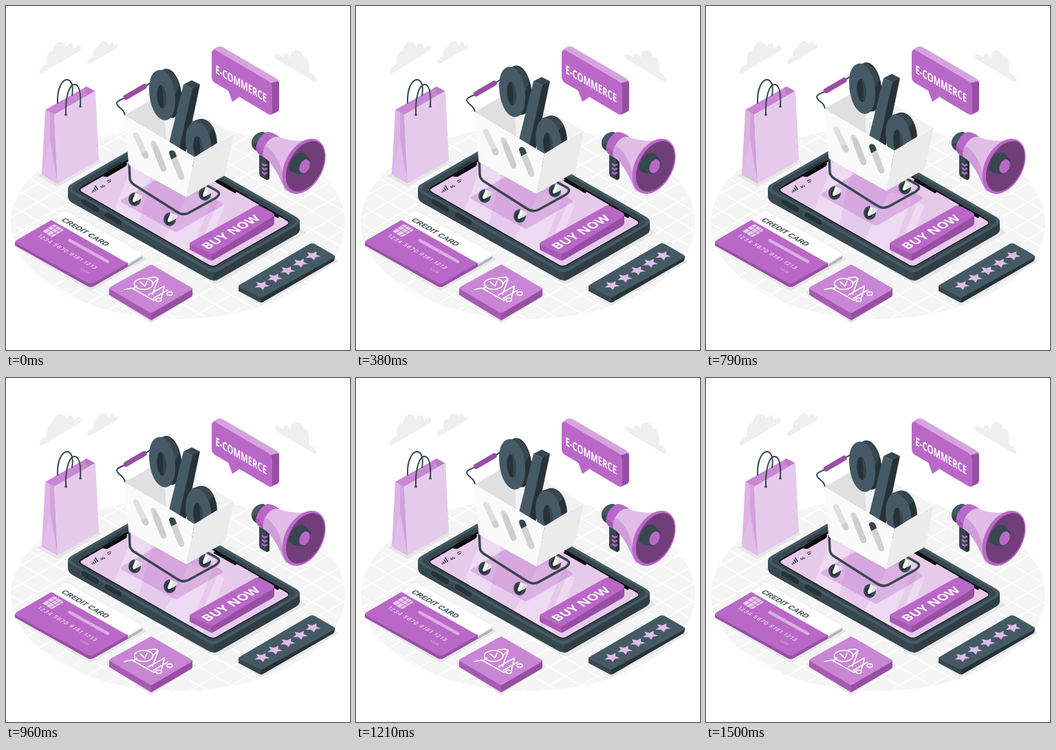
These frames come from a looping animation (500x500 px, 1540 ms). An HTML page:

```html
<!DOCTYPE html>
<html lang="en">
<head>
<meta charset="utf-8">
<title>E-commerce</title>
<style>
html, body { margin: 0; width: 100%; height: 100%; overflow: hidden; background: #fff; }
svg { display: block; width: 100vw; height: 100vh; }
text { font-family: "Open Sans", "Noto Sans", sans-serif; font-weight: 700; fill: #fff; }
.p { fill: #ba68c8; }
.p1 { fill: #c986d4; }
.p2 { fill: #964fa3; }
.p3 { fill: #d5a4de; }
.p4 { fill: #e6caec; }
.d { fill: #37474f; }
.d1 { fill: #455a64; }
.d2 { fill: #263238; }
.sh { fill: #e6e6e6; }
.rod { fill: none; stroke: #37474f; stroke-linecap: round; stroke-linejoin: round; }
.ink { fill: none; stroke: #fff; stroke-width: 1.7; stroke-linecap: round; stroke-linejoin: round; }
</style>
</head>
<body>
<svg viewBox="0 0 500 500">
<defs>
  <clipPath id="floorClip"><ellipse cx="250" cy="315" rx="243" ry="140"/></clipPath>
  <clipPath id="screenClip"><path id="screen" d="M110 265L214 205Q218 203 222 205L408 312Q413 315 408 318L306 376Q301 379 295 376L110 270Q106 267 110 265Z"/></clipPath>
  <clipPath id="slotClip"><path id="slots" d="M185 189C184 183 191 182 193 187L207 216C209 222 202 224 199 219ZM210 201C209 195 216 194 219 199L233 235C234 241 228 243 225 238ZM237 215C236 209 243 208 246 213L259 247C260 253 254 255 251 250Z"/></clipPath>
  <g id="wheel">
    <ellipse class="d" rx="9" ry="10"/>
    <ellipse class="d2" cx="-1" cy="1" rx="5" ry="6.5"/>
    <path d="M-3 3C-3-2 0-4 1-10L11-5C9 1 3 2 0 4Q-2 5-3 3Z" fill="#fafafa"/>
    <path d="M5-8L11-5C9 1 3 2 0 4Q4-1 5-8Z" fill="#e0e0e0"/>
  </g>
</defs>

<rect width="500" height="500" fill="#fff"/>
<g clip-path="url(#floorClip)">
  <rect y="170" width="500" height="290" fill="#f5f5f5"/>
  <path id="grid" stroke="#fff" stroke-width="1.3" fill="none"/>
</g>

<g fill="#efefef">
  <path d="M49 98C47 93 53 87 60 84C57 74 63 63 68 66C68 56 78 48 85 55Q88 58 87 61C92 51 99 52 98 62L105 57C110 56 111 63 106 66L54 97Q50 99 49 98Z"/>
  <path d="M118 83C117 79 122 75 127 73C125 65 130 58 134 60C135 52 142 49 147 53Q149 55 149 58C152 50 157 50 157 58L160 56C164 55 164 60 160 62L122 84Q119 85 118 83Z"/>
  <path d="M451 110C454 105 447 100 440 96C443 83 438 71 432 74C431 66 422 61 416 67Q413 71 414 76C411 68 404 66 403 75L395 70C390 68 389 75 394 78L446 109Q450 111 451 110Z"/>
</g>

<!-- shopping bag -->
<path class="sh" d="M45 246L75 263L138 227L128 221Z"/>
<path class="p1" d="M57 151L117 117L130 124L70 158Z"/>
<path class="p2" opacity=".25" d="M117 117L130 124L120 130L113 119Z"/>
<path class="rod" stroke-width="2" d="M75 141C74 119 82 107 89 107C96 108 98 118 96 130"/>
<path d="M57 151L70 158L75 258L52 245Z" fill="#dcb5e4"/>
<path d="M64 155L70 158L75 258L64 195Z" fill="#d2a2dc"/>
<path d="M52 245L64 195L75 258Z" fill="#e0bee7"/>
<path class="p4" d="M70 158L130 123L135 224L75 258Z"/>
<path class="rod" stroke-width="2" d="M87 157C86 130 93 113 100 114C107 115 109 128 108 146"/>
<g class="d"><circle cx="87" cy="158" r="1.8"/><circle cx="108" cy="146" r="1.8"/></g>

<!-- phone -->
<path class="sh" d="M86 278L300 403Q307 405 314 401L436 330L420 315L110 262Z"/>
<path class="d" d="M90 265V276Q90 282 96 286L293 396Q302 402 311 396L422 332Q428 328 427 322V312L300 300Z"/>
<path class="d2" d="M302 389V400Q307 399 311 396L422 332Q428 328 427 322V312Z" opacity=".45"/>
<path class="d1" d="M96 258L207 194Q216 189 225 194L421 306Q433 313 421 320L311 384Q302 390 292 384L96 272Q84 265 96 258Z"/>
<path d="M100 260L209 197Q216 193 223 197L417 308Q425 313 417 318L309 380Q302 384 294 380L100 270Q92 265 100 260Z" fill="#37474f"/>
<path d="M108 264L212 203Q217 200 223 203L408 310Q415 314 408 319L306 377Q301 380 295 377L108 270Q104 267 108 264Z" fill="#000"/>
<use href="#screen" class="p4"/>
<g clip-path="url(#screenClip)">
  <path d="M196 200L222 200L190 330L152 310ZM267 270L300 280L262 375L224 350ZM308 285L318 290L282 380L270 375Z" fill="#fff" opacity=".3"/>
  <path d="M305 252L335 269L333 271L303 254ZM369 289L397 305L395 307L367 291Z" stroke="#000" stroke-width="2"/>
  <path d="M134 250L140 247Q144 249 148 248L174 233Q177 230 175 227L186 220L184 214L132 244Z"/>
</g>
<path class="d2" d="M147 237L166 226Q169 226 168 229L150 239Q146 240 147 237Z"/>
<g fill="none" stroke="#263238" stroke-width="1.5">
  <path d="M126 271l-1-1.5M128.500 270l-2-3M131 268.500l-3-4.500M133.500 267l-4-6"/>
  <path d="M147 255q2-3 6-2M148.500 257q1.500-2 4-1.500" stroke-width="1.100"/>
</g>
<text transform="matrix(.866 -.5 .866 .5 139 265)" font-size="5.500" style="fill:#263238">4G</text>
<g class="d2" stroke="#455a64" stroke-width="1">
  <path d="M109 281Q111 279 115 281L133 291Q137 294 136 299Q134 302 130 300L112 289Q107 286 109 281Z"/>
  <path d="M143 301Q145 298 149 300L166 310Q170 313 169 318Q167 320 163 318L146 308Q141 305 143 301Z"/>
</g>

<!-- buy button -->
<path class="p2" d="M267 345V354L296 369Q299 371 302 369L387 320Q390 318 390 314V302Z"/>
<path d="M267 345V354L296 369L299 370V360Z" fill="#a85bb5"/>
<path class="p" d="M269 343L362 291Q366 289 370 291L387 300Q392 303 387 307L303 359Q299 361 295 359L269 347Q265 345 269 343Z"/>
<text transform="matrix(.866 -.5 .8 .5 293 354.500)" font-size="18.500">BUY NOW</text>

<!-- credit card -->
<path class="sh" d="M10 348L123 414L204 368L190 355Z"/>
<path d="M66 311L82 298Q86 296 90 298L196 358Q199 360 198 363V368L177 381Z" fill="#fafafa"/>
<path d="M176 375L198 362V368L177 381Z" fill="#e0e0e0"/>
<path d="M177 377L198 364.500M177 379L198 366.500" stroke="#455a64" stroke-width=".6"/>
<path d="M66 311L82 298Q86 296 90 298L196 358Q199 360 198 362L176 375Z" fill="#fff" stroke="#e6e6e6" stroke-width=".7"/>
<path class="p2" d="M13 343V348L118 407Q123 410 128 407L177 379V373Z"/>
<path class="p" d="M16 340L66 311L177 374L128 402Q123 405 118 402L16 346Q11 343 16 340Z"/>
<text transform="matrix(.866 .5 -.866 .5 79.500 311.500)" font-size="11" style="fill:#37474f;font-family:'Liberation Sans',Arial,sans-serif">CREDIT CARD</text>
<path class="p4" d="M54 327L68 318Q70 317 72 318L82 324Q85 326 82 327L69 335Q67 336 65 335L55 329Q53 328 54 327Z"/>
<path d="M60 323L75 332M66 320L79 328M58 331L75 320M64 334L81 324" class="ink" style="stroke:#ba68c8;stroke-width:1"/>
<path d="M92.500 340.500L148 371.500" stroke="#d9aee2" stroke-width="4.500" stroke-linecap="round"/>
<g style="font-family:Inter,sans-serif">
  <text id="digits" transform="matrix(.866 .5 -.866 .5 45 334.500)" font-size="8.200" letter-spacing=".95" style="font-weight:500;fill:#f4e6f7;font-family:Inter,sans-serif">1234 5670 9181 1213</text>
  <text transform="matrix(.866 .5 -.866 .5 106.500 382)" font-size="5" style="font-weight:500;fill:#ead2ef">12/20</text>
</g>

<!-- cart tile -->
<path class="sh" d="M145 416L211 461L276 418L211 385Z"/>
<path d="M150 410V420L208 455Q211 457 211 457V440Z" fill="#a65ab3"/>
<path class="p2" d="M211 440V457L269 423Q271 422 271 420V410Z"/>
<path class="p1" d="M152 408L208 377Q211 375 214 377L269 409Q272 411 269 413L214 445Q211 447 208 445L152 412Q149 410 152 408Z"/>
<g class="ink">
  <path d="M172 412L183 410L215 428L219 425M185 411L190 407M214 403L221 396L217 394L207 395M207 420L230 407M214 425L235 413M221 397L213 419M230 409L226 424"/>
  <ellipse cx="200" cy="404" rx="13.500" ry="8"/>
  <path d="M195 401L202 407L205 400"/>
  <ellipse cx="222" cy="427" rx="4" ry="2.500"/><ellipse cx="238" cy="418" rx="4" ry="2.500"/>
</g>

<!-- rating bar -->
<path class="sh" d="M334 413L371 435L483 371L470 360Z"/>
<path class="d2" d="M338 408V414L368 430Q371 432 374 430L476 371Q478 369 478 363Z"/>
<path class="d" d="M338 408V414L368 430L371 431V422Z"/>
<path class="d1" d="M340 405L441 346Q445 344 449 346L475 361Q480 364 475 367L375 422Q371 425 367 422L340 409Q336 407 340 405Z"/>
<path id="stars" fill="#e0bbe7"/>

<!-- speech bubble -->
<path class="p1" d="M299 68Q300 62 309 59Q312 59 315 60L392 105Q397 108 397 113L387 120Z"/>
<path class="p3" d="M302 63L310 59Q313 59 316 61L392 105Q395 107 396 110L387 115Q386 112 381 109L310 68Q305 64 302 63Z"/>
<path class="p2" d="M385 112L396 109Q397 111 397 114V149Q397 152 394 154L385 158ZM329 139L338 133L338 128L325 125Z"/>
<path class="p" d="M299 69Q299 62 306 65L381 109Q387 113 387 119V153Q387 160 381 157L339 132L329 139L323 123L304 112Q299 109 299 103Z"/>
<text transform="matrix(.665 .384 0 1 304.500 97.500)" font-size="17">E-COMMERCE</text>

<!-- megaphone -->
<path class="d" d="M368 216L383 222V250Q381 254 377 252L370 248Q368 246 368 243Z"/>
<path class="d2" d="M378 221L383 223V250Q381 254 378 252Z"/>
<path d="M372 229l4 3l4-2M372 235l4 3l4-2M372 241l4 3l4-2" fill="none" stroke="#ba68c8" stroke-width="2.400"/>
<path class="d" d="M374 183C363 183 356 193 357 201C358 208 363 211 369 212L385 192Z"/>
<path class="d1" d="M374 183C363 183 356 193 357 201L366 198Q370 190 380 186Z"/>
<path class="p" d="M380 183C370 186 361 202 364 211Q367 217 376 220L397 190Q388 183 380 183Z"/>
<path class="p2" opacity=".55" d="M364 205Q363 213 376 220L381 214Q371 212 368 206Z"/>
<path d="M395 190Q422 200 452 193L407 270C396 245 388 228 374 219C372 206 382 189 395 190Z" fill="#e0bee7"/>
<path d="M374 219C372 213 375 207 378 203Q402 222 403 258L407 270C396 245 388 228 374 219Z" fill="#cf9dda"/>
<ellipse class="p" cx="433" cy="233" rx="27.500" ry="43" transform="rotate(28 433 233)"/>
<ellipse cx="435" cy="233" rx="24" ry="39.500" transform="rotate(28 435 233)" fill="#713e79"/>
<path class="d" d="M411 238C412 222 422 210 434 214L443 225L432 244Q421 246 411 238Z"/>
<ellipse class="p" cx="434" cy="233" rx="7" ry="10.500" transform="rotate(24 434 233)"/>

<!-- floating cart -->
<g id="cart">
  <path d="M169 281L231 245Q235 243 239 245L313 286Q317 289 313 291L251 327Q247 330 243 327L169 286Q165 284 169 281Z" fill="#ba68c8" opacity=".36"/>
  <path class="rod" stroke-width="2" d="M173 160C173 149 161 148 161 141C161 138 168 136 174 133L202 117L211 111L216 114"/>
  <path d="M174.500 132.500L201 117" stroke="#964fa3" stroke-width="7.500" stroke-linecap="round"/>
  <use href="#wheel" x="289" y="273"/>
  <path class="rod" stroke-width="3.500" d="M179 229L180 250Q180 255 185 259L248 299Q257 305 265 301L305 279Q313 273 307 269L291 260"/>
  <use href="#wheel" x="187" y="281"/>
  <use href="#wheel" x="238" y="310"/>
  <path d="M172 159L229 126L233 194L180 232Z" fill="#e0e0e0"/>
  <path d="M229 126L330 186L274 224L233 194Z" fill="#f2f2f2"/>
  <g>
    <ellipse class="d2" cx="237" cy="127" rx="18" ry="36" transform="rotate(-8 237 127)"/>
    <path class="d" d="M222 95L231 91.500Q245 94 252 116L245 130Z"/>
    <path class="d1" fill-rule="evenodd" d="M208 120C208 101 216 92 225 93C238 95 246 115 246 137C246 157 239 167 230 166C217 164 208 143 208 120Z"/>
    <ellipse class="d2" cx="226" cy="132" rx="6.500" ry="17" transform="rotate(-5 226 132)"/>
    <path class="d" d="M226 115Q232 120 232 134Q232 145 228 149Q230 130 226 115Z"/>
    <path class="d2" d="M271 119L282 114L261 214L248 211Z"/>
    <path class="d1" d="M258 114L271 120L251 211L236 203Z"/>
    <path class="d" d="M258 114L270 108L282 114L271 120Z"/>
    <path class="d2" d="M272 171L284 164C298 164 308 184 307 205L298 225Z"/>
    <path class="d" d="M270 168L282 164Q294 164 302 178L294 186Z"/>
    <path class="d1" d="M261 196C261 177 268 167 277 168C290 170 299 189 299 211L292 236L272 232Q261 215 261 196Z"/>
    <ellipse class="d2" cx="279" cy="206" rx="6.800" ry="17" transform="rotate(-5 279 206)"/>
    <path class="d" d="M280 189Q286 195 286 208L282 221Q283 204 280 189Z"/>
  </g>
  <path d="M172 159L274 220L262 278L180 232Q178 231 178 227Z" fill="#fafafa"/>
  <path d="M274 220L331 185L319 243Q318 246 315 248L262 278Z" fill="#ebebeb"/>
  <path d="M172 159L274 220L331 185" fill="none" stroke="#fff" stroke-width="1"/>
  <use href="#slots" fill="#e0e0e0"/>
  <g clip-path="url(#slotClip)">
    <path d="M192 216L210 208V230H192ZM212 195L236 222V245H220Z" fill="#cecece"/>
    <path d="M236 214L262 232V260H244Z" fill="#d2d2d2"/>
    <path class="d" d="M234 205H250L248 219L240 223Z"/>
  </g>
</g>
</svg>
<script>
const byId = id => document.getElementById(id);
const LOOP = 1540, LIFT = 9.6, SLOPE = 0.577;

let grid = "";
for (let y = -120; y < 760; y += 27) {
  grid += `M0 ${y}L500 ${y + 500 * SLOPE}M0 ${y}L500 ${y - 500 * SLOPE}`;
}
byId("grid").setAttribute("d", grid);

// five-pointed star lying on the floor plane
function star(cx, cy) {
  let d = "";
  for (let i = 0; i < 10; i++) {
    const r = i % 2 ? 4.6 : 9.6, a = i * Math.PI / 5 - Math.PI / 2;
    const u = r * Math.cos(a), v = r * Math.sin(a);
    d += `${i ? "L" : "M"}${(cx + 0.866 * (u + v)).toFixed(1)} ${(cy + 0.5 * (v - u)).toFixed(1)}`;
  }
  return d + "Z";
}
byId("stars").setAttribute("d", [0, 1, 2, 3, 4].map(i => star(372 + 18.5 * i, 406 - 10.8 * i)).join(""));

const cart = byId("cart");
const start = performance.now();
function draw(now) {
  const p = Math.max(0, now - start) % LOOP / LOOP;
  const y = -LIFT * (1 - Math.abs(1 - 2 * p));
  cart.setAttribute("transform", `translate(0 ${y.toFixed(2)})`);
  requestAnimationFrame(draw);
}
draw(start);
</script>
</body>
</html>
```
